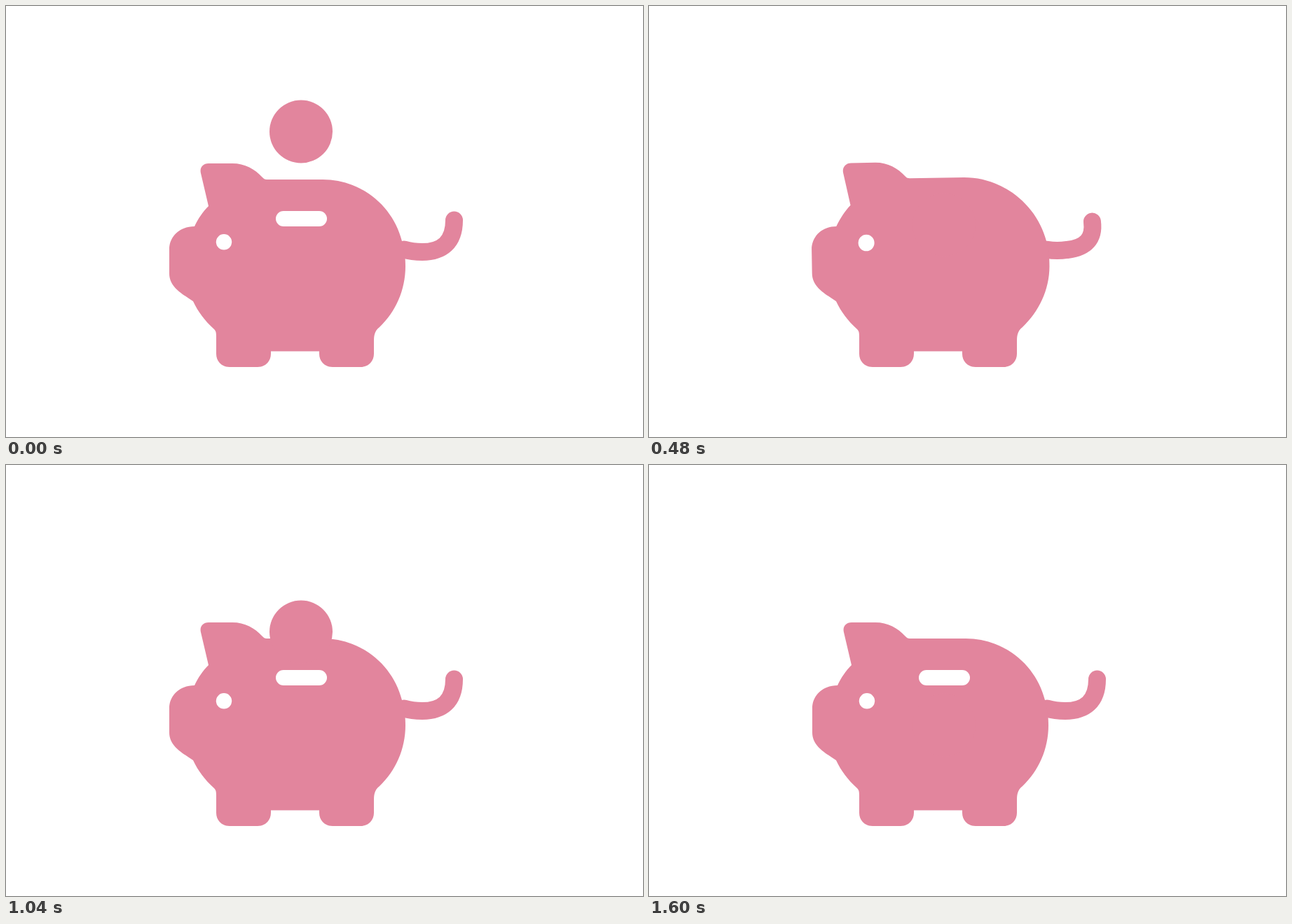
Write an HTML page that moves like this. It is 909 px wide and 616 px high and loops after 1760 ms.

```html
<!DOCTYPE html>
<html lang="en">
<head>
<meta charset="utf-8">
<title>Piggy bank</title>
<style>
  html, body { margin: 0; width: 100%; height: 100%; overflow: hidden; background: #fff; }
  svg { display: block; width: 909px; height: 616px; }
</style>
</head>
<body>
<svg viewBox="0 0 909 616" fill="#e2859d">
  <path id="tail" fill="none" stroke="#e2859d" stroke-width="25" stroke-linecap="round"/>
  <path id="body"/>
  <ellipse id="eye" fill="#fff"/>
  <rect id="slot" fill="#fff"/>
  <circle id="coin" cx="421" r="45"/>
</svg>
<script>
const LOOP = 1760, STEP = 40, DROP = 760;

const legs = `C525 465 525 473 525 480 L525 497 C525 508 517 516 506 516
  L466 516 C455 516 447 508 447 497 L447 493.5 L378 493.5 L378 497
  C378 508 370 516 359 516 L319 516 C308 516 300 508 300 497 L300 472
  C300 465 299 464 296 461 C284 450 274 437 267 422`;

const bodyRest = `M289 225 L323 225 C341 225 355 233 366 245 C368 247 369 248 372 248
  L452 248 C506 248 552 285 565 336 C569 349 570 360 570 372
  C570 406 556 437 533 459 ${legs}
  C253 412 233 403 233 382 L233 348 C233 329 248 315 269 315
  C274 304 281 294 289 286 L278 239 C276 231 281 225 289 225 Z`;

const bodyFull = `M288 224 L323 223 C341 223 355 231 366 243 C368 245 369 245 372 245
  L448 243 C506 243 555 285 568.5 336 C572 349 572.5 360 572.5 372
  C572.5 406 556 437 533 459 ${legs}
  C253 412 233 403 232.5 382 L231.5 348 C231.5 329 247 315 266 315
  C272 303 279 292 286.5 284 L276.5 238 C275 231 280 224 288 224 Z`;

const tailRest = 'M568 348 C578 351 586 351.5 594 351.5 C622 351.5 639.5 338 639.5 306';
const tailCurl = 'M568 349 C580 348.5 592 346 603.7 341.4 C628 331.5 626 318 616 313';

const el = id => document.getElementById(id);
const set = (id, attrs) => {
  for (const name in attrs) el(id).setAttribute(name, attrs[name]);
};

// Blend two paths that share the same commands.
function blend(a, b, k) {
  const target = b.match(/[\d.]+/g);
  let i = 0;
  return a.replace(/[\d.]+/g, n => (+n + (target[i++] - n) * k).toFixed(2));
}

function ease(t, from, to) {
  const x = Math.min(1, Math.max(0, (t - from) / (to - from)));
  return x * x * (3 - 2 * x);
}
const pulse = (t, start, peak, end) => ease(t, start, peak) - ease(t, peak, end);

function draw(t) {
  const phase = t < DROP ? t : t - DROP;
  const swell = 1.17 * pulse(phase, 400, 560, 715);
  // The tail is still uncurling when the second coin starts to fall.
  const curl = pulse(t, 400, 620, 840) + pulse(t - DROP, 400, 620, 840);

  set('coin', { cy: 179.5 + 192 * ease(phase, 0, DROP) });
  set('body', { d: blend(bodyRest, bodyFull, swell) });
  set('tail', { d: blend(tailRest, tailCurl, curl) });
  set('eye', { cx: 311 - 1.5 * swell, cy: 337.3 + 2.2 * swell, rx: 11.2 + 0.5 * swell, ry: 11.2 + swell });
  set('slot', { x: 385 - 3 * swell, y: 293 - 3.2 * swell, width: 73 + 4.5 * swell, height: 22 + swell, rx: 11 });
}

const start = performance.now();
function frame() {
  const t = (performance.now() - start) % LOOP;
  draw(Math.floor(t / STEP) * STEP);
  requestAnimationFrame(frame);
}
frame();
</script>
</body>
</html>
```
